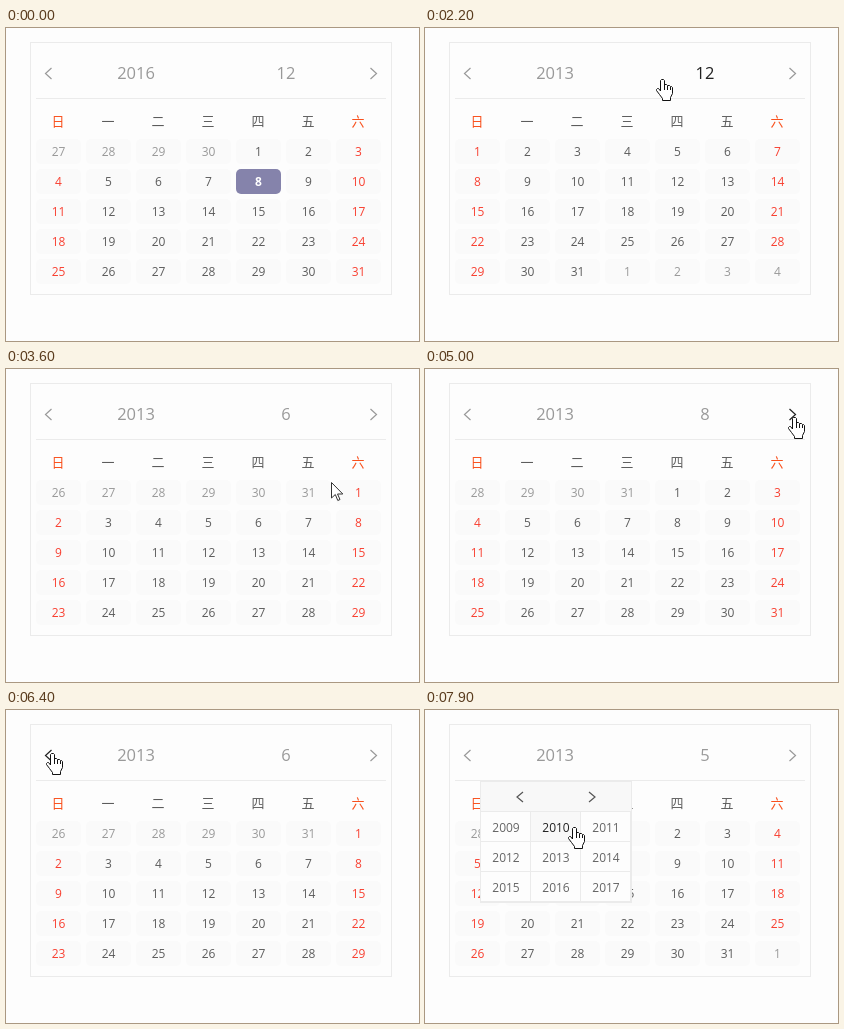
These frames come from a looping animation (413x313 px, 8000 ms). An HTML page with a canvas:

```html
<!DOCTYPE html>
<html lang="zh">
<head>
<meta charset="utf-8">
<title>Calendar</title>
<style>
html, body { margin: 0; width: 100%; height: 100%; overflow: hidden; background: #fdfdfd; }
canvas { display: block; }
</style>
</head>
<body>
<canvas id="stage" width="413" height="313"></canvas>
<script>
const ctx = document.getElementById('stage').getContext('2d');
const LOOP = 8000, STEP = 100, CELL_W = 50, CELL_H = 30;
const SANS = '"Open Sans", "Noto Sans", sans-serif';
const CJK = '"Noto Sans CJK SC", "Noto Sans CJK", sans-serif';
const BG = '#fdfdfd', LINE = '#ebebeb', GREY = '#999', TEXT = '#5c5c5c', DARK = '#222';

// Pointer strokes: start, end, target point and, for curves, a control point
const strokes = [
  [100, 700, 129, 45, 180, 112],
  [1200, 1500, 136, 112],
  [1900, 2400, 279, 41, 239, 38],
  [2500, 2700, 296, 41],
  [2900, 3000, 308, 128],
  [3100, 3400, 325, 113],
  [3700, 4200, 369, 48, 290, 142],
  [5000, 5800, 46, 43, 270, 115],
  [6800, 6900, 136, 42],
  [7000, 7200, 151, 42],
  [7400, 7900, 149, 117]
];
const clicks = [1100, 1900, 2900, 3600, 4500, 5000, 6000, 6400, 6800, 7400];

const hand = new Path2D('M4.5 12V1.5L5.5.5H7.5L8.5 1.5V5.5H10.5L11.5 6.5H13.5L14.5 7.5H15.5L16.5 8.5V14.5L14.5 18.5V21.5H6.5V19.5L3.5 15.5L.5 11.5V10.5L1.5 9.5H2.5Z');
const fingers = new Path2D('M8.5 5V11M11.5 7V11M14.5 8V11');
const arrow = new Path2D('M.5.5V16L4.3 12.5L6.8 18.5L9 17.5L6.5 12H11.8Z');

function pointerAt(t) {
  if (t < strokes[0][0]) return null;
  let x = 385, y = 40;
  for (const [start, end, tx, ty, cx = (x + tx) / 2, cy = (y + ty) / 2] of strokes) {
    if (t < start) break;
    const u = Math.min(1, (t - start) / (end - start));
    const bend = (a, c, b) => (1 - u) ** 2 * a + 2 * u * (1 - u) * c + u * u * b;
    [x, y] = [bend(x, cx, tx), bend(y, cy, ty)];
  }
  return { x: Math.round(x), y: Math.round(y) };
}

const inside = (p, x, y, w, h) => p && p.x >= x && p.x < x + w && p.y >= y && p.y < y + h;

function pickerCells({ open, year }) {
  const byYear = open === 'year';
  return Array.from({ length: byYear ? 9 : 12 }, (_, i) => ({
    value: byYear ? year - 4 + i : i + 1,
    x: (byYear ? 55 : 205) + i % 3 * CELL_W,
    y: (byYear ? 101 : 71) + Math.floor(i / 3) * CELL_H
  }));
}

function zoneAt(p, { open }) {
  if (inside(p, 30, 30, 350, 40))
    return p.x < 55 ? 'prev' : p.x < 206 ? 'year' : p.x < 357 ? 'month' : 'next';
  return open && inside(p, open === 'year' ? 55 : 205, 70, 152, 122) ? 'picker' : '';
}

// Replay every click up to time t
function stateAt(t) {
  const s = { year: 2016, month: 12, open: '' };
  for (const time of clicks) {
    if (time > t) break;
    const p = pointerAt(time), zone = zoneAt(p, s);
    if (zone === 'prev') s.month--;
    else if (zone === 'next') s.month++;
    else if (zone === 'picker') {
      const cell = pickerCells(s).find(c => inside(p, c.x, c.y, CELL_W, CELL_H));
      if (cell) s[s.open] = cell.value;
      s.open = '';
    } else s.open = zone;
  }
  return s;
}

function text(str, x, y, color, size = 12, family = SANS, weight = 400) {
  ctx.font = `${weight} ${size}px ${family}`;
  ctx.fillStyle = color;
  ctx.fillText(str, x, y);
}

function box(x, y, w, h, fill) {
  ctx.fillStyle = fill;
  ctx.fillRect(x, y, w, h);
  ctx.strokeStyle = LINE;
  ctx.lineWidth = 1;
  ctx.strokeRect(x + .5, y + .5, w, h);
}

function chevron(x, y, dir, color, h = 5.5) {
  ctx.beginPath();
  ctx.moveTo(x - dir * 3, y - h);
  ctx.lineTo(x + dir * 3, y);
  ctx.lineTo(x - dir * 3, y + h);
  ctx.strokeStyle = color;
  ctx.lineWidth = 1.2;
  ctx.stroke();
}

function drawDays({ year, month }) {
  const first = new Date(year, month - 1, 1).getDay();
  const today = new Date(2016, 11, 8).getTime();
  for (let i = 0; i < 35; i++) {
    const date = new Date(year, month - 1, 1 - first + i);
    const col = i % 7, x = 30 + col * CELL_W, y = 111 + Math.floor(i / 7) * CELL_H;
    const isToday = date.getTime() === today;
    ctx.fillStyle = isToday ? '#8583ab' : '#fafafa';
    ctx.beginPath();
    ctx.roundRect(x, y, 45, 25, 5);
    ctx.fill();
    const color = isToday ? '#fff' : date.getMonth() !== month - 1 ? GREY : col % 6 ? TEXT : '#f83f30';
    text(date.getDate(), x + 22.5, y + 17, color, 12, SANS, isToday ? 700 : 400);
  }
}

function drawPicker(state, p) {
  const left = state.open === 'year' ? 55 : 205;
  box(left, 71, 151, 121, '#f8f8f8');
  if (state.open === 'year') {
    chevron(left + 40, 87, -1, '#555', 5);
    chevron(left + 112, 87, 1, '#555', 5);
  }
  for (const { x, y, value } of pickerCells(state)) {
    const over = inside(p, x, y, CELL_W, CELL_H);
    box(x, y, CELL_W, CELL_H, over ? '#f8f8f8' : BG);
    text(value, x + 26, y + 21, over ? DARK : '#666');
  }
  box(left, 71, 151, 121, 'transparent');
}

function drawPointer(p, isHand) {
  ctx.save();
  ctx.translate(p.x - (isHand ? 6 : 0), p.y);
  ctx.fillStyle = '#fff';
  ctx.strokeStyle = isHand ? '#111' : '#333';
  ctx.lineWidth = 1;
  ctx.fill(isHand ? hand : arrow);
  ctx.stroke(isHand ? hand : arrow);
  if (isHand) ctx.stroke(fingers);
  ctx.restore();
}

function draw(t) {
  const state = stateAt(t), p = pointerAt(t), zone = zoneAt(p, state);
  const tone = name => zone === name ? DARK : GREY;

  ctx.fillStyle = BG;
  ctx.fillRect(0, 0, 413, 313);
  box(24, 14, 361, 252, BG);
  ctx.fillStyle = LINE;
  ctx.fillRect(30, 70, 350, 1);

  ctx.textAlign = 'center';
  chevron(42.5, 45.5, -1, tone('prev'));
  chevron(367.5, 45.5, 1, tone('next'));
  text(state.year, 130, 51, tone('year'), 16.5);
  text(state.month, 280, 51, tone('month'), 16.5);
  [...'日一二三四五六'].forEach((d, i) =>
    text(d, 52 + i * CELL_W, 98, i % 6 ? TEXT : '#f9501c', 13, CJK));

  drawDays(state);
  if (state.open) drawPicker(state, p);
  if (p) drawPointer(p, zone !== '');
}

function frame(now) {
  draw(Math.floor(now % LOOP / STEP) * STEP);
  requestAnimationFrame(frame);
}
requestAnimationFrame(frame);
</script>
</body>
</html>
```
